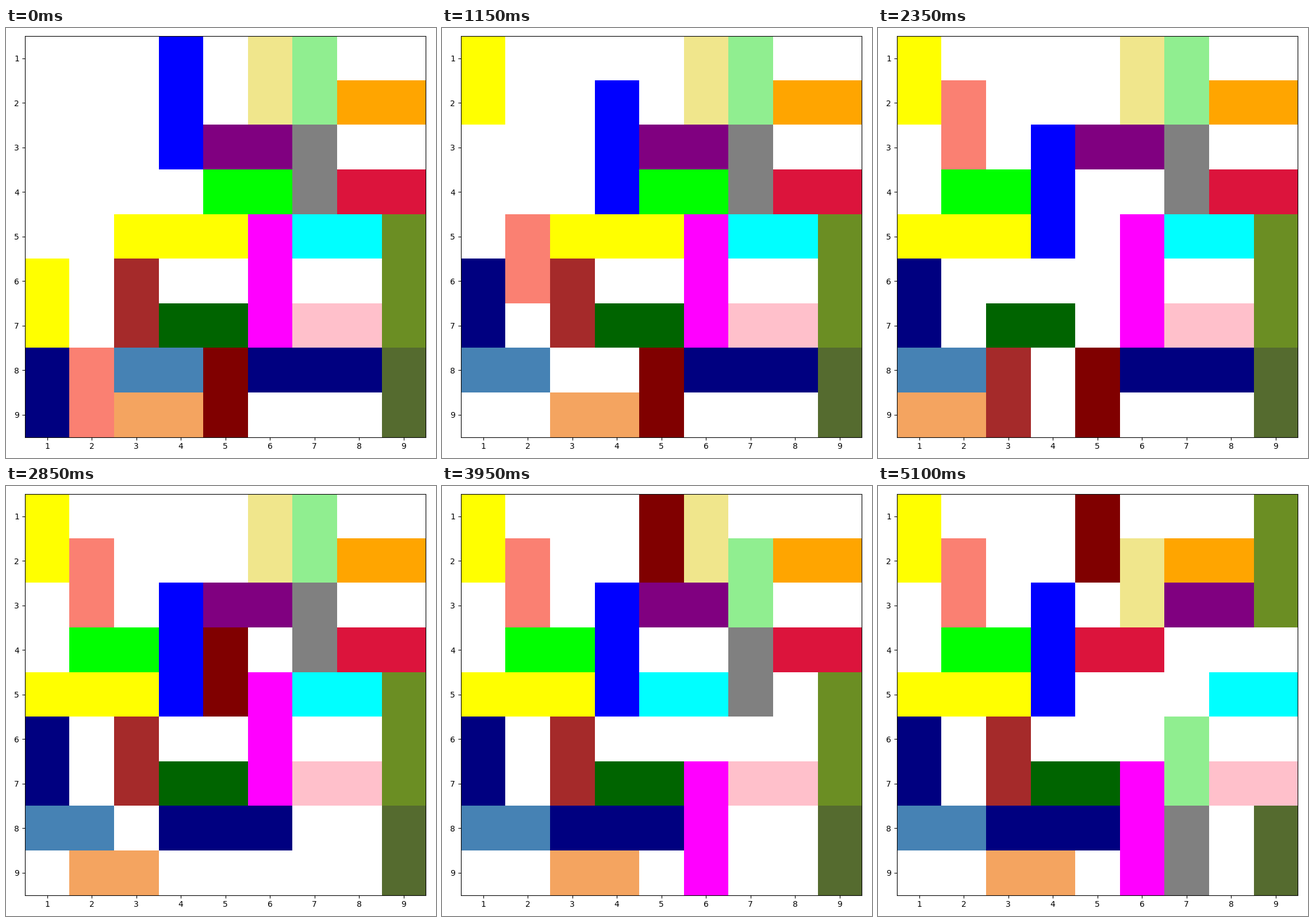
A matplotlib script that plays this animation: 748x748 px, repeating every 5150 ms.

```python
import numpy as np
import matplotlib.pyplot as plt
from matplotlib.animation import FuncAnimation
from matplotlib.patches import Rectangle

SIZE, DPI, STEP_MS = 748, 100, 50
N = 9

# Axes box in pixels, measured from the top left corner
LEFT, TOP, SIDE = 32.8, 14.0, 697.6

# Whole-pixel cell borders
X_EDGES = np.round(32.8 + 77.6 * np.arange(N + 1))
Y_EDGES = np.round(13.25 + 77.6 * np.arange(N + 1))

# Upper case slides vertically, lower case horizontally: colour, row, column, length
BLOCKS = {
    "A": ("yellow", 6, 1, 2),
    "B": ("navy", 8, 1, 2),
    "C": ("salmon", 8, 2, 2),
    "D": ("brown", 6, 3, 2),
    "E": ("blue", 1, 4, 3),
    "F": ("maroon", 8, 5, 2),
    "G": ("khaki", 1, 6, 2),
    "H": ("magenta", 5, 6, 3),
    "I": ("lightgreen", 1, 7, 2),
    "J": ("gray", 3, 7, 2),
    "K": ("olivedrab", 5, 9, 3),
    "L": ("darkolivegreen", 8, 9, 2),
    "a": ("orange", 2, 8, 2),
    "b": ("purple", 3, 5, 2),
    "c": ("lime", 4, 5, 2),
    "d": ("crimson", 4, 8, 2),
    "e": ("yellow", 5, 3, 3),
    "f": ("cyan", 5, 7, 2),
    "g": ("darkgreen", 7, 4, 2),
    "h": ("pink", 7, 7, 2),
    "i": ("steelblue", 8, 3, 2),
    "j": ("navy", 8, 6, 3),
    "k": ("sandybrown", 9, 3, 2),
}

# Block and signed number of cells, one cell per step; "_" waits
MOVES = """
E1 _2 C-2 i-1 A-3 e-2 E2 E-2
e2 A-2 B-2 i-1 C-5 e-2 C1
_1 A1 _1 E-1 c-3 E1 _2
A-1 E1 k-2 D2 g-1 F-2 j-2
F-2 g1 D-2 k2 j-1 H2 E1
b-2 G1 _1 F-2 _2
F-1 G-1 b2 E-1 f-2 J1 I1 J1 d-1
d-2 I1 a-1 K-4 h1 J1 I1
J2 I2 b2 G1 f3
"""


def build_states():
    """Offset of every block along its lane, for each step."""
    offset = dict.fromkeys(BLOCKS, 0)
    states = [offset.copy()]
    for move in MOVES.split():
        name, count = move[0], int(move[1:])
        for _ in range(abs(count)):
            if name in offset:
                offset[name] += 1 if count > 0 else -1
            states.append(offset.copy())
    return states


def place(name, patch, shift):
    _, row, col, length = BLOCKS[name]
    if name.isupper():
        row, width, height = row + shift, 1, length
    else:
        col, width, height = col + shift, length, 1
    x0, x1 = X_EDGES[[col - 1, col - 1 + width]]
    y0, y1 = Y_EDGES[[row - 1, row - 1 + height]]
    patch.set_bounds(x0, SIZE - y1, x1 - x0, y1 - y0)


fig = plt.figure(figsize=(SIZE / DPI, SIZE / DPI), dpi=DPI, facecolor="white")
ax = fig.add_axes([LEFT / SIZE, 1 - (TOP + SIDE) / SIZE, SIDE / SIZE, SIDE / SIZE])
ax.set(xlim=(0.5, N + 0.5), ylim=(N + 0.5, 0.5),
       xticks=range(1, N + 1), yticks=range(1, N + 1))

patches = {}
for name, (color, *_) in BLOCKS.items():
    patch = Rectangle((0, 0), 1, 1, facecolor=color, linewidth=0,
                      antialiased=False, transform=None)
    fig_patch = ax.add_artist(patch)
    patches[name] = fig_patch

states = build_states()


def draw(step):
    for name, patch in patches.items():
        place(name, patch, states[step][name])
    return list(patches.values())


anim = FuncAnimation(fig, draw, frames=len(states), interval=STEP_MS,
                     repeat=True, repeat_delay=0)
plt.show()
```
